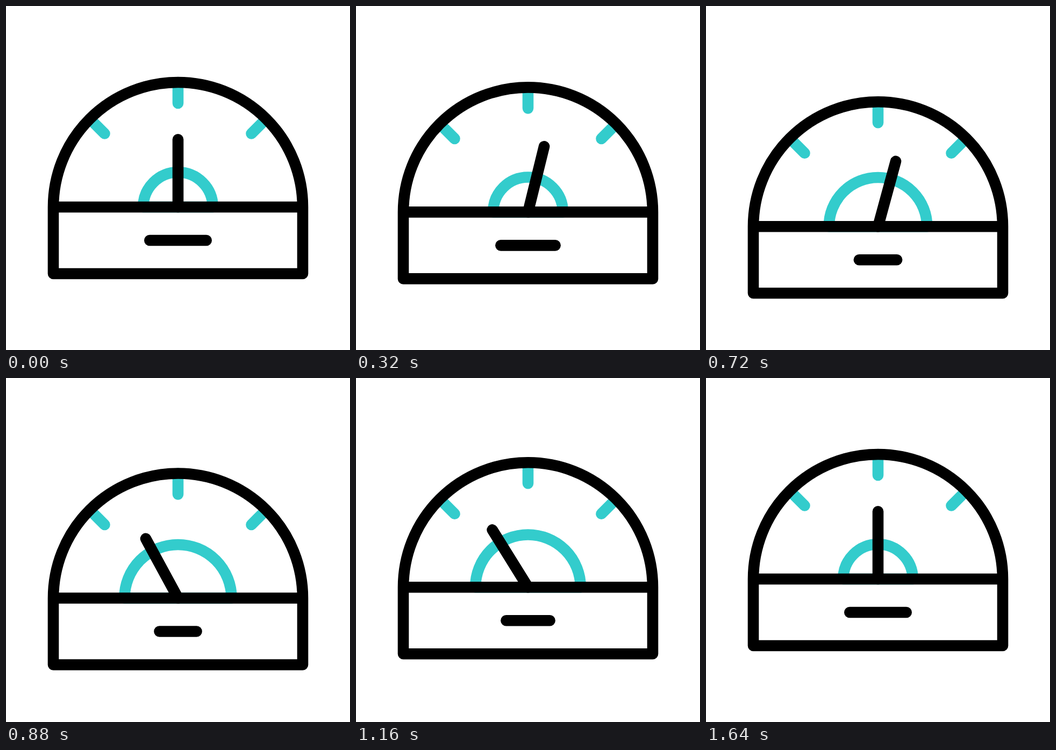
Recreate the animation shown at these times as an HTML page. Size 640x640 px, loop 1840 ms.

```html
<!DOCTYPE html>
<html lang="en">
<head>
<meta charset="utf-8">
<title>Gauge</title>
<style>
  html, body { margin: 0; width: 100%; height: 100%; overflow: hidden; background: #fff; }
  svg { display: block; width: 100%; height: 100%; }
</style>
</head>
<body>
<svg viewBox="0 0 640 640">
  <g id="gauge" fill="none" stroke="#000" stroke-width="20.6" stroke-linecap="round" stroke-linejoin="round">
    <g stroke="#33cccc">
      <path d="M0-232V-193M-164-164l27.5 27.5M164-164l-27.5 27.5"/>
      <path id="ring"/>
    </g>
    <path id="needle" d="M0 0V-125.8"/>
    <path d="M-232 0A232 232 0 0 1 232 0ZM-232 0H232V124H-232Z"/>
    <path id="dash"/>
  </g>
</svg>
<script>
const STEP = 40, LOOP = 1840;
const [gauge, ring, needle, dash] =
  ['gauge', 'ring', 'needle', 'dash'].map(id => document.getElementById(id));

// Ease in and out along cubic-bezier(.6, 0, .4, 1)
function ease(x) {
  let lo = 0, hi = 1;
  for (let i = 0; i < 24; i++) {
    const s = (lo + hi) / 2, r = 1 - s;
    if (1.8 * s * r * r + 1.2 * s * s * r + s * s * s < x) lo = s; else hi = s;
  }
  return lo * lo * (3 - 2 * lo);
}

// Keys are [time in steps, value] pairs
function track(keys, t) {
  if (t <= keys[0][0]) return keys[0][1];
  for (let i = 1; i < keys.length; i++) {
    const [t0, v0] = keys[i - 1], [t1, v1] = keys[i];
    if (t < t1) return v0 + (v1 - v0) * ease((t - t0) / (t1 - t0));
  }
  return keys[keys.length - 1][1];
}

const drop = [[0.8, 0], [19.2, 36.4], [37.6, 0]];
const angle = [[3.7, 0], [13.1, 35], [25.2, -35], [39.8, 0]];
const radius = [[6.9, 64.7], [25.3, 100.9], [39.8, 64.7]];
const half = [[2.7, 52.7], [21.2, 34.5], [39.3, 52.7]];

function draw(now) {
  const t = Math.floor(now % LOOP / STEP);
  const r = track(radius, t), h = track(half, t);
  gauge.setAttribute('transform', `translate(320 ${374 + track(drop, t)})`);
  needle.setAttribute('transform', `rotate(${track(angle, t)})`);
  ring.setAttribute('d', `M${-r} 0A${r} ${r} 0 0 1 ${r} 0Z`);
  dash.setAttribute('d', `M${-h} 62H${h}`);
}

const start = performance.now();
function tick() {
  draw(performance.now() - start);
  requestAnimationFrame(tick);
}
tick();
</script>
</body>
</html>
```
